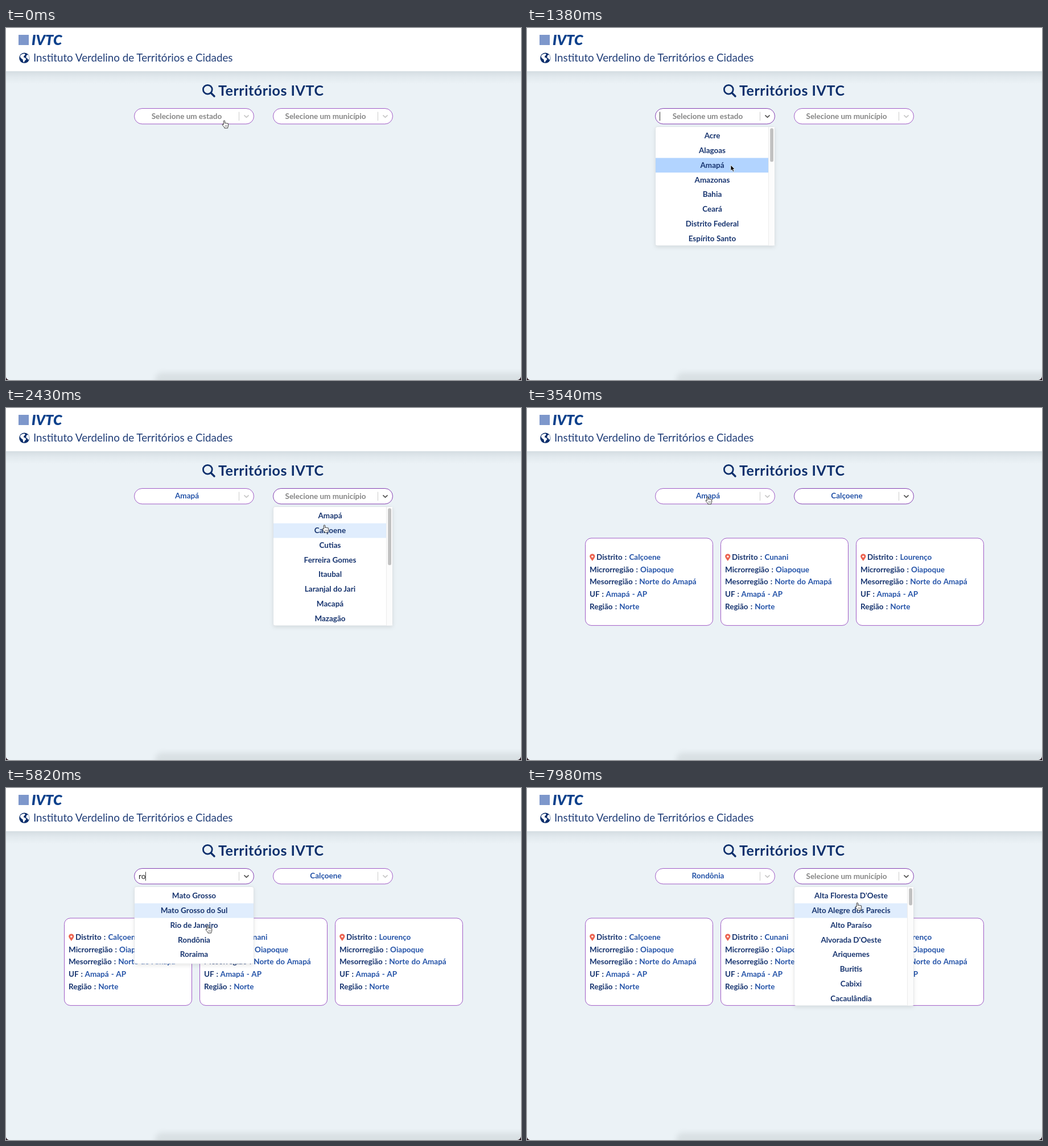
Recreate the animation shown at these times as an HTML page. Size 905 by 619 pixels, loop 8000 ms.

```html
<!DOCTYPE html>
<html lang="pt-BR">
<head>
<meta charset="utf-8">
<title>Territórios</title>
<style>
html, body { margin: 0; width: 100%; height: 100%; overflow: hidden; background: #ebf2f6; }
svg { display: block; width: 100vw; height: 100vh; }
text { font: 700 13.5px Lato, "Open Sans", sans-serif; fill: #17346f; white-space: pre; }
.mid { text-anchor: middle; }
.hint { fill: #858585; }
.value { fill: #2453a8; }
.light { fill: #fff; }
.typed { font-weight: 400; fill: #222; }
.brand { font: italic 900 25px Lato, sans-serif; fill: #0d418c; }
.name { font-weight: 400; font-size: 18.75px; fill: #213e78; }
.title { font-size: 25px; letter-spacing: .55px; fill: #0d2f6c; }
.card { word-spacing: .8px; }
</style>
</head>
<body>
<svg viewBox="0 0 905 619" xmlns="http://www.w3.org/2000/svg">
  <defs>
    <linearGradient id="fade" x2="0" y2="1">
      <stop offset="0" stop-color="#8d9aa3" stop-opacity=".24"/>
      <stop offset=".45" stop-color="#8d9aa3" stop-opacity=".1"/>
      <stop offset="1" stop-color="#8d9aa3" stop-opacity="0"/>
    </linearGradient>
    <filter id="soft" x="-10%" y="-80%" width="120%" height="260%"><feGaussianBlur stdDeviation="5"/></filter>
    <filter id="drop" x="-10%" y="-10%" width="120%" height="125%">
      <feDropShadow dx="0" dy="2.5" stdDeviation="3.5" flood-opacity=".1"/>
    </filter>
  </defs>
  <rect width="905" height="619" fill="#ebf2f6"/>
  <rect x="262" y="606" width="680" height="40" rx="12" fill="#b4bbbe" opacity=".32" filter="url(#soft)"/>
  <path d="M0 614v5h5q-4-1-5-5ZM905 613v6h-6q5-1 6-6Z" fill="#2b1720"/>
  <rect y="76" width="905" height="22" fill="url(#fade)"/>
  <rect width="905" height="76" fill="#fff"/>
  <rect x="22" y="12" width="18" height="18" fill="#7d97cb"/>
  <text class="brand" x="45" y="30">IVTC</text>
  <circle cx="32.3" cy="52.7" r="9.1" fill="#0d2f6c"/>
  <path d="M25.2 48.5 28 46l4.5-1 1.4 2-2.4 2.2-.6 2.2 2.8 1 1.9 2.4-3 3.4-.9 2.2-1.7-1.4-.4-3.5-2.9-1.9-1.8-2.6ZM36 48l3-1.3 1.7 3.8v4.2l-1.6 1.4-1.6-2.6-2.3-1.5Z" fill="#fff"/>
  <text class="name" x="48" y="59">Instituto Verdelino de Territórios e Cidades</text>
  <g fill="none" stroke="#0d2f6c">
    <circle cx="354.3" cy="108.2" r="7.9" stroke-width="2.8"/>
    <path d="m360.2 114.2 5.8 5.8" stroke-width="3.4" stroke-linecap="round"/>
  </g>
  <text class="title" x="373" y="119">Territórios IVTC</text>
  <g id="scene"></g>
  <g id="pointer"></g>
</svg>
<script>
const LOOP = 8000, ROW = 25.75, TOP = 177, SHIFT = 244, BLINK = 450;
const scene = document.getElementById('scene');
const pointer = document.getElementById('pointer');
const pen = document.createElement('canvas').getContext('2d');

const STATES = ('Acre,Alagoas,Amapá,Amazonas,Bahia,Ceará,Distrito Federal,Espírito Santo,Goiás,' +
  'Maranhão,Mato Grosso,Mato Grosso do Sul,Minas Gerais,Pará,Paraíba,Paraná,Pernambuco,Piauí,' +
  'Rio de Janeiro,Rio Grande do Norte,Rio Grande do Sul,Rondônia,Roraima,Santa Catarina,' +
  'São Paulo,Sergipe,Tocantins').split(',');
const AMAPA = 'Amapá,Calçoene,Cutias,Ferreira Gomes,Itaubal,Laranjal do Jari,Macapá,Mazagão'.split(',');
const RONDONIA = ("Alta Floresta D'Oeste,Alto Alegre dos Parecis,Alto Paraíso,Alvorada D'Oeste," +
  'Ariquemes,Buritis,Cabixi,Cacaulândia').split(',');

// Pointer path: time, x, y
const PATH = [
  [0, 383.5, 163], [90, 383.5, 163], [420, 371, 158], [480, 371, 159], [810, 358, 241],
  [1440, 358, 241], [1860, 575, 158], [2100, 574, 160], [2270, 577, 327], [2430, 559.5, 206],
  [2670, 559, 209], [2940, 559, 209], [3540, 317.5, 156], [3720, 317.5, 156], [3960, 339, 155],
  [4440, 339, 155], [4740, 441, 360], [5300, 441, 360], [5340, 441, 272], [5550, 441, 272],
  [5740, 385, 212], [5820, 354.5, 242], [6210, 336, 268], [6720, 336, 268], [7020, 538, 191],
  [7290, 573, 157], [7410, 573, 158], [7680, 584, 332], [7980, 580.5, 202], [8000, 580.5, 202]
];

const within = (t, a, b) => t >= a && t < b;

function pointerAt(t) {
  const i = Math.max(1, PATH.findIndex(p => p[0] > t));
  const [t0, x0, y0] = PATH[i - 1], [t1, x1, y1] = PATH[i];
  const p = Math.min(1, Math.max(0, (t - t0) / (t1 - t0)));
  const k = p * p * (3 - 2 * p);
  return [x0 + (x1 - x0) * k, y0 + (y1 - y0) * k];
}

function stateAt(t) {
  const typed = within(t, 4500, 6720) ? (t < 4680 ? 'r' : 'ro') : '';
  const s = {
    typed,
    values: [t < 1440 ? '' : t < 6720 ? 'Amapá' : 'Rondônia', within(t, 2910, 6720) ? 'Calçoene' : ''],
    focus: t < 450 ? -1 : within(t, 1950, 3720) || t >= 7380 ? 1 : 0,
    pressed: within(t, 1320, 1440) || within(t, 2850, 2910) || within(t, 6660, 6720),
    menu: null
  };
  if (within(t, 450, 1440) || within(t, 3720, 6720)) {
    const items = STATES.filter(n => n.toLowerCase().includes(typed));
    s.menu = { side: 0, items, total: items.length };
  } else if (within(t, 1950, 2910)) s.menu = { side: 1, items: AMAPA, total: 16 };
  else if (t >= 7380) s.menu = { side: 1, items: RONDONIA, total: 52 };
  return s;
}

const text = (x, y, cls, str) => `<text x="${x}" y="${y}" class="${cls}">${str}</text>`;

function caretOn(t) {
  const base = [7380, 4680, 4500, 3720, 1950, 450].find(b => t >= b);
  return base !== undefined && Math.floor((t - base) / BLINK) % 2 === 0;
}

function drawSelect(side, s, t) {
  const x = side * SHIFT, on = s.focus === side, typed = side ? '' : s.typed;
  const hint = side ? 'Selecione um município' : 'Selecione um estado';
  let out = `<rect x="${x + 225.5}" y="141.5" width="210" height="27.3" rx="13.6" fill="#fff"
    stroke="${on ? '#8440b2' : '#a05cc6'}"/>
    <path d="M${x + 409.5} 147.5v15.5" stroke="#ccc"/>
    <path d="m${x + 419} 153.8 3.5 3.4 3.5-3.4" fill="none" stroke="${on ? '#555' : '#c8c8c8'}"
    stroke-width="1.8" stroke-linecap="round" stroke-linejoin="round"/>`;
  if (typed) out += text(233, 159.5, 'typed', typed);
  else if (s.values[side]) out += text(x + 318, 159, 'mid value', s.values[side]);
  else out += text(x + 317.5, 159.5, 'mid hint', hint);
  if (on && caretOn(t)) {
    pen.font = '400 13.5px Lato, "Open Sans", sans-serif';
    const cx = x + 233.5 + (typed && pen.measureText(typed).width - .5);
    out += `<path d="M${cx} 147.5v15.5" stroke="#333"/>`;
  }
  return out;
}

function hoverRow(t, m, s, rows) {
  const [x, y] = pointerAt(Math.max(0, t - 40));
  const row = Math.floor((y - TOP) / ROW), left = 226 + m.side * SHIFT;
  if (row >= 0 && row < rows && x > left && x < left + 209) return row;
  return Math.max(0, m.items.indexOf(s.values[m.side]));
}

function drawMenu(s, t) {
  const m = s.menu;
  if (!m) return '';
  const x = 226 + m.side * SHIFT, rows = Math.min(8, m.items.length);
  const long = m.total > 8, w = long ? 199 : 209, h = long ? 208.5 : rows * ROW + 6;
  const hover = hoverRow(t, m, s, rows);
  let out = `<rect x="${x - .5}" y="173.5" width="210" height="${h + 1}" rx="3.5" fill="#d5d9dd" filter="url(#drop)"/>
    <rect x="${x}" y="174" width="209" height="${h}" rx="3" fill="#fff"/>`;
  m.items.slice(0, rows).forEach((name, i) => {
    const y = TOP + i * ROW, chosen = name === s.values[m.side];
    const height = Math.min(ROW, 174 + h - y);
    const fill = i === hover && s.pressed ? '#b2d4ff' : chosen ? '#2684ff' : i === hover ? '#e0edfd' : '';
    if (fill) out += `<rect x="${x}" y="${y}" width="${w}" height="${height}" fill="${fill}"/>`;
    out += text(x + w / 2, y + 17.4, chosen ? 'mid light' : 'mid', name);
  });
  if (long) {
    const thumb = 206 * 206 / (m.total * ROW + 6) - 1.5;
    out += `<rect x="${x + w}" y="174" width="10" height="${h}" fill="#fcfcfc"/>
      <path d="M${x + w - .5} 174v${h}" stroke="#ececec"/>
      <rect x="${x + 201.2}" y="176.3" width="5.8" height="${thumb}" rx="2.9" fill="#c1c1c1"/>`;
  }
  return out;
}

function drawCard(name, i) {
  const x = 102.5 + i * 238;
  const lines = [['Distrito', name], ['Microrregião', 'Oiapoque'], ['Mesorregião', 'Norte do Amapá'],
    ['UF', 'Amapá - AP'], ['Região', 'Norte']];
  return `<rect x="${x}" y="228.9" width="224" height="153.5" rx="10.5" fill="#fff" stroke="#a05cc6"/>
    <path d="M${x + 12.3} 269q-4.7-5.7-4.7-7.9a4.7 4.7 0 0 1 9.4 0q0 2.2-4.7 7.9Z" fill="#ec6350"/>
    <circle cx="${x + 12.3}" cy="261.2" r="1.7" fill="#fff"/>` +
    lines.map(([label, value], n) => text(x + (n ? 7.5 : 19.5), 267 + n * 21.65, 'card',
      `${label} : <tspan class="value">${value}</tspan>`)).join('');
}

function drawPointer(s, t) {
  const [x, y] = pointerAt(t), m = s.menu;
  const inSide = side => x > 225 + side * SHIFT && x < 436 + side * SHIFT;
  const overSelect = y > 141 && y < 170 && (inSide(0) || inSide(1));
  const overMenu = m && inSide(m.side) && y > 173 && y < TOP + Math.min(8, m.items.length) * ROW;
  const hand = !s.pressed && (overSelect || overMenu);
  const shape = hand
    ? `<path d="M-1.2 7V1a1.2 1.2 0 0 1 2.4 0V4.7a1.1 1.1 0 0 1 2.1.1 1.1 1.1 0 0 1 2 .5 1 1 0 0 1 1.9.6V9q0 1.4-1 2.6V13H.3v-1.3Q-2 9.5-3.3 7.3q-.3-1.5 1-1.3Z"
        fill="#fff" stroke="#222" stroke-width=".9" stroke-linejoin="round"/>
       <path d="M1.7 8v2.6M3.3 8v2.6M4.9 8v2.6" stroke="#444" stroke-width=".6"/>`
    : `<path d="M0 0V10.2L2.3 8.1 4 11.8 5.8 11 4.2 7.5H7.2Z" fill="#000" stroke="#fff" stroke-width=".8"/>`;
  return `<g transform="translate(${x} ${y})">${shape}</g>`;
}

function render(t) {
  const s = stateAt(t);
  const cards = t >= 3030 ? ['Calçoene', 'Cunani', 'Lourenço'].map(drawCard).join('') : '';
  scene.innerHTML = cards + drawSelect(0, s, t) + drawSelect(1, s, t) + drawMenu(s, t);
  pointer.innerHTML = drawPointer(s, t);
}

const start = performance.now();
function tick() {
  render((performance.now() - start) % LOOP);
  requestAnimationFrame(tick);
}
tick();
</script>
</body>
</html>
```
